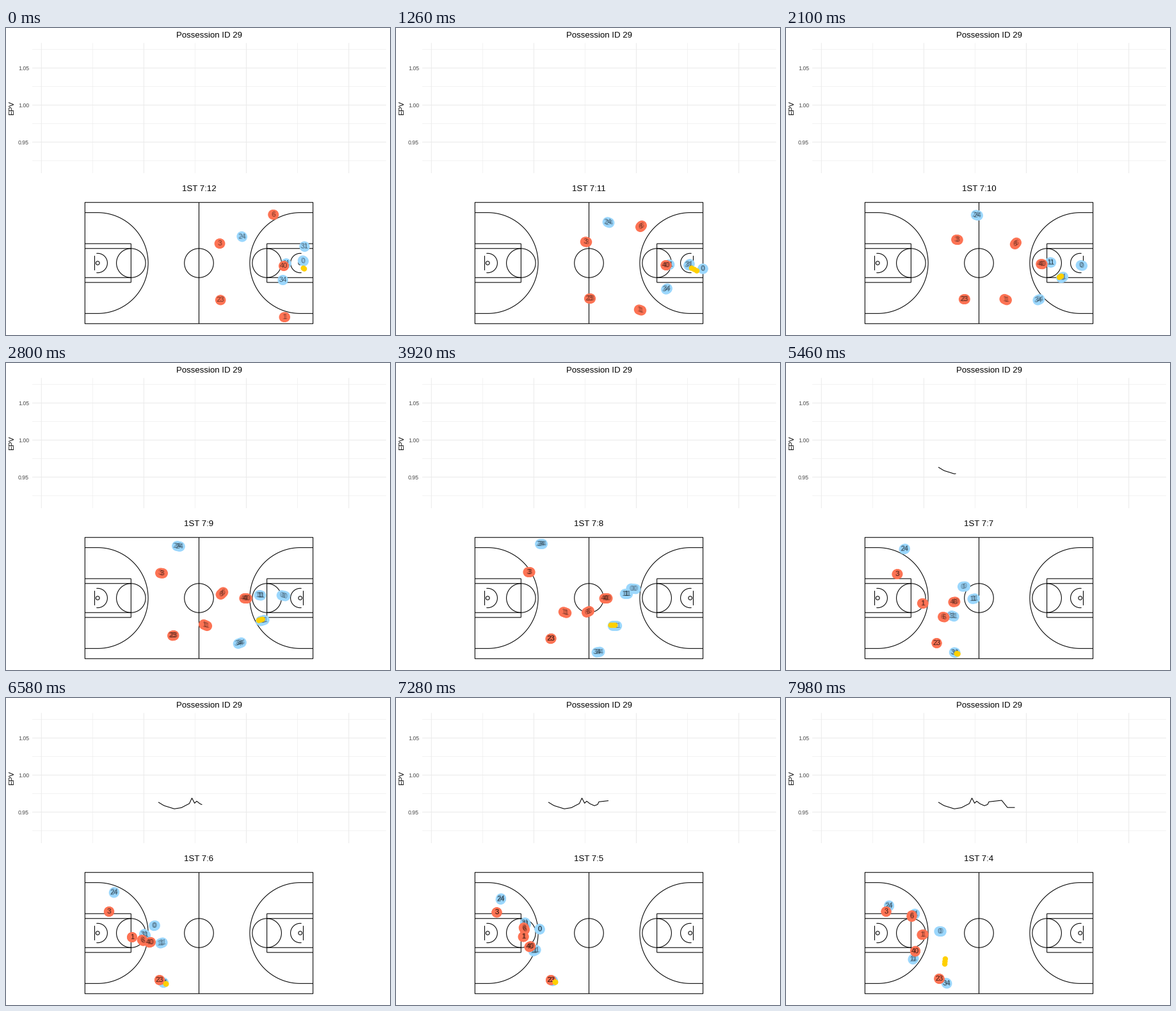
Recreate the animation shown at these times as a matplotlib script. Size 600x480 px, loop 8000 ms.

```python
import numpy as np
import matplotlib.pyplot as plt
from matplotlib.animation import FuncAnimation
from matplotlib.collections import LineCollection

plt.rcParams["font.family"] = "Liberation Sans"

W, H = 600, 480
LOOP, TICK, STEP = 8000, 40, 140      # ms
SAMPLE = 0.04                         # s between tracking samples
BLUE, RED, GOLD = "#9bd7fd", "#fd7354", "#ffd000"
FT = 3.791                            # pixels per foot
MID, CY = 301.5, 367.5                # centre of the court

# Each run is a quartic through five places at these seconds
KEYS = [0, 1.26, 3.92, 6.58, 7.98]
OFFENCE = {
    "24": [(369.5, 327), (332, 304), (227, 283), (169, 304), (161, 325)],
    "31": [(466, 341), (458, 370), (342, 411), (217, 370), (201, 338)],
    "0": [(463, 363), (479.5, 376.5), (371, 353), (232, 356), (241, 365)],
    "11": [(438, 368), (427, 370), (360, 361), (243, 383), (199, 408)],
    "34": [(432, 394), (423, 408), (316, 452), (246, 445), (251, 446)],
}
DEFENCE = {
    "6": [(419, 292), (383, 310), (300, 389), (213.5, 379), (196.5, 341)],
    "3": [(335, 337), (297, 334.5), (208, 327), (161, 334), (156.5, 334)],
    "40": [(434, 372), (422, 371), (328, 368), (225, 382), (202, 396)],
    "23": [(336, 425.5), (303, 423), (242, 431), (240, 441), (239.5, 439)],
    "1": [(437, 452), (381.5, 441), (264, 390), (197, 374), (213.5, 370)],
}
# Ball: where each handler carries it, and passes as start, end, receiver
CARRY = {"0": (1, 12), "31": (-3, -1), "34": (4, 2)}
PASSES = [(1.09, 1.39, "31"), (4.4, 4.9, "34"), (7.64, 8.31, "0")]

EPV = np.array([
    (238.5, 163.2), (247, 168.3), (263, 173.3), (274, 171.5), (286.5, 165),
    (290.5, 156.5), (294.7, 164.5), (298, 161.3), (303, 165.3), (310, 168.4),
    (315, 166.5), (317, 162.3), (337, 160), (346, 171.2), (358, 171.2),
]).T


def fit(runs):
    return {name: np.polyfit(KEYS, places, 4) for name, places in runs.items()}


def ball_at(t, paths):
    held = lambda name: np.polyval(paths[name], t) + CARRY[name]
    pos = held("0")
    for start, end, name in PASSES:
        u = np.clip((t - start) / (end - start), 0, 1)
        pos = pos + u * (held(name) - pos)
    return pos


def arc(x, y, r, start=0, end=360):
    a = np.radians(np.linspace(start, end, 100))
    return np.column_stack([x + r * np.cos(a), y + r * np.sin(a)])


fig = plt.figure(figsize=(W / 72, H / 72), dpi=72, facecolor="white")
ax = fig.add_axes([0, 0, 1, 1])
ax.set_xlim(0, W)
ax.set_ylim(H, 0)
ax.axis("off")


def strokes(lines, color, width, z):
    ax.add_collection(LineCollection(lines, colors=color, linewidths=width,
                                     zorder=z, snap=False))


def draw_grid():
    rows = [[(41, y), (594, y)] for y in 120.5 + 28.95 * np.arange(-3, 4)]
    cols = [[(x, 23.5), (x, 227)] for x in 55.3 + 80.05 * np.arange(7)]
    strokes(rows[0::2] + cols[1::2], "#ebebeb", 0.6, 1)
    strokes(rows[1::2] + cols[0::2], "#ebebeb", 1.07, 1)
    for k in (-1, 0, 1):
        ax.text(36, 123.9 - 57.9 * k, f"{1 + k / 20:.2f}", size=8.8, color="#4d4d4d",
                ha="right", va="baseline")
    ax.text(9, 125, "EPV", size=11, rotation=90, ha="center", va="center")
    ax.text(317.5, 15, "Possession ID 29", size=13.2, ha="center", va="baseline")


def draw_court():
    left, top, bottom = MID - 47 * FT, CY - 25 * FT, CY + 25 * FT
    hoop, foul, board = left + 5.25 * FT, left + 19 * FT, left + 4 * FT
    three = 20.8 * FT
    half = [
        [(MID, top), (left, top), (left, bottom), (MID, bottom)],
        [(foul, CY - 8 * FT), (foul, CY + 8 * FT)],
        [(board, CY - 3 * FT), (board, CY + 3 * FT)],
        arc(foul, CY, 6 * FT),
        arc(hoop, CY, 0.75 * FT),
        arc(hoop, CY, 4 * FT, -97, 97),
        np.vstack([[(left, CY - three)], arc(hoop, CY, three, -90, 90), [(left, CY + three)]]),
    ]
    half += [[(left, CY + w * FT), (foul, CY + w * FT)] for w in (-8, -6, 6, 8)]
    lines = [[(MID, top), (MID, bottom)], arc(MID, CY, 6 * FT)]
    for part in half:
        part = np.array(part, float)
        lines += [part, part * (-1, 1) + (2 * MID, 0)]
    strokes(lines, "black", 1.07, 2)


def dots(size, color, z):
    return ax.scatter([], [], s=size ** 2, facecolors=color, edgecolors="none", zorder=z)


class Team:
    def __init__(self, runs, color, z):
        self.paths = fit(runs)
        self.dots = dots(15.8, color, z)
        self.tags = [[ax.text(0, 0, name, size=11, alpha=0.33, ha="center",
                              va="center", zorder=z + 1) for _ in range(4)]
                     for name in runs]

    def show(self, times):
        spots = []
        for path, tags in zip(self.paths.values(), self.tags):
            for tag in tags:
                tag.set_visible(False)
            for tag, t in zip(tags, times):
                spots.append(np.polyval(path, t))
                tag.set_position(spots[-1])
                tag.set_visible(True)
        self.dots.set_offsets(spots)


draw_grid()
draw_court()
clock = ax.text(301.5, 255, "", size=13.2, ha="center", va="baseline")
curve, = ax.plot([], [], color="black", lw=1.07, zorder=3)
offence, defence = Team(OFFENCE, BLUE, 4), Team(DEFENCE, RED, 6)
ball = dots(8.4, GOLD, 8)


def update(i):
    n = (i * TICK + TICK // 2) // STEP
    t = n * STEP / 1000

    # Every step shows all samples that fall in it, three or four in turn
    count = 4 - n % 2
    times = t + SAMPLE * (np.arange(count) - (count - 1) / 2)
    times = times[times >= 0]
    offence.show(times)
    defence.show(times)
    ball.set_offsets([ball_at(s, offence.paths) for s in times])
    clock.set_text(f"1ST 7:{int(12.7 - t)}")

    x, y = EPV
    end = max(x[0], 265 + 36.5 * (t - 5.46))
    seen = x < end
    curve.set_data(np.append(x[seen], end), np.append(y[seen], np.interp(end, x, y)))
    curve.set_visible(end > x[0])


anim = FuncAnimation(fig, update, frames=LOOP // TICK, interval=TICK,
                     repeat=True, repeat_delay=0, blit=False)
plt.show()
```
